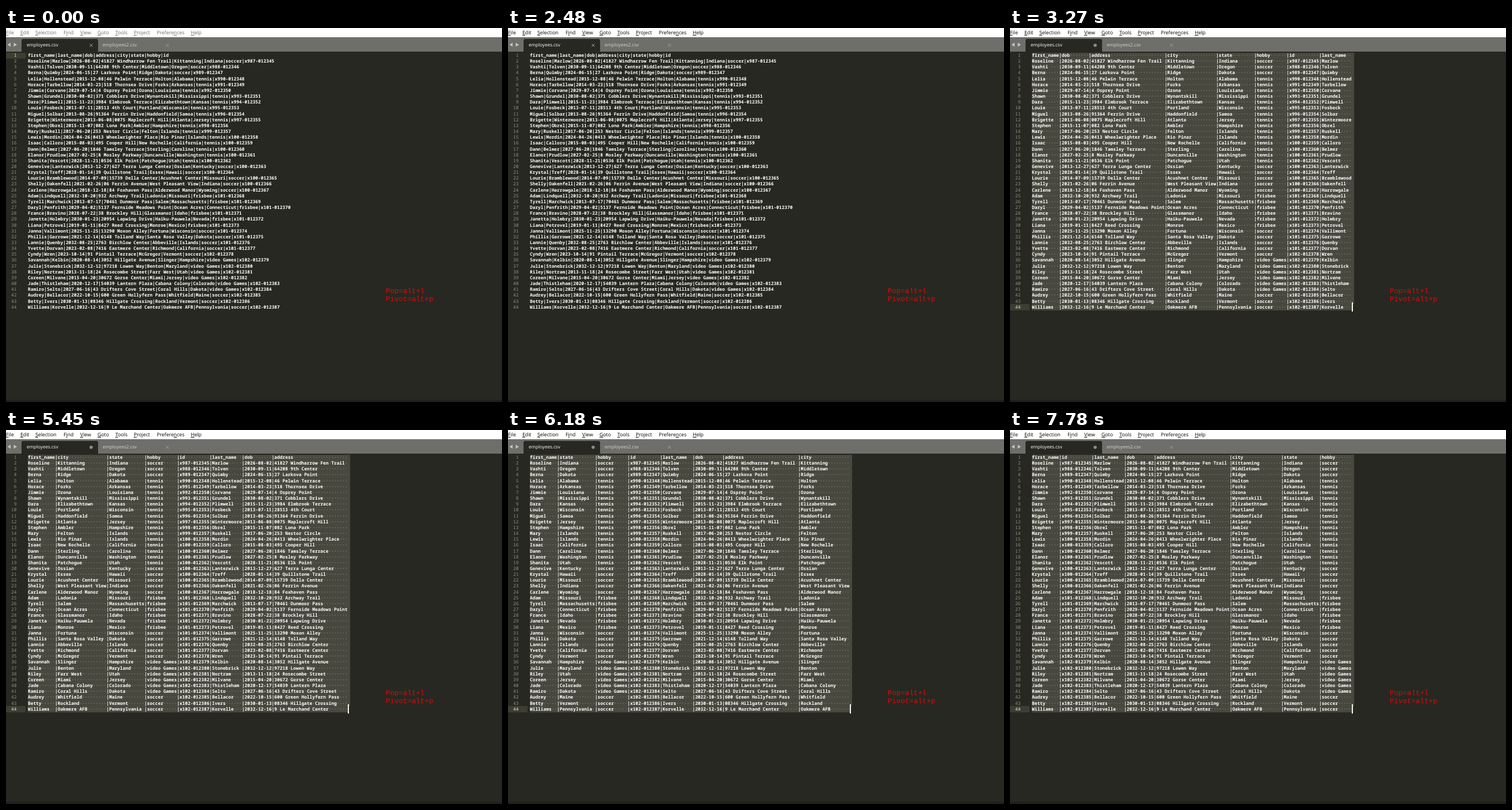
Recreate the animation shown at these times as an HTML page. Size 862 px wide and 649 px high, loop 8000 ms.

```html
<!DOCTYPE html>
<html lang="en">
<head>
<meta charset="utf-8">
<title>Column pivot</title>
<style>
  html, body { margin: 0; width: 100%; height: 100%; overflow: hidden; background: #272822; }
  #stage { position: relative; width: 862px; height: 649px; overflow: hidden; background: #272822;
    text-rendering: geometricPrecision; }
  #stage > *, #menu span, #tabs > *, .selection { position: absolute; white-space: pre; }
  #stage svg { left: 0; top: 0; }
  #menu { left: 0; top: 0; width: 862px; height: 16px; background: #fff; color: #000;
    font: 8.7px/17px "Open Sans", sans-serif; }
  #menu.idle { color: #6d6d6d; }
  #menu u { text-underline-offset: 1px; text-decoration-thickness: 1px; }
  #tabs { left: 0; top: 16px; width: 862px; height: 25px; background: #6e6f6a;
    font: 8.1px/24px "Open Sans", sans-serif; }
  #tabs span { top: 2px; }
  #code, #numbers { top: 43px; margin: 0; font: 600 7.857px/10.15px "Noto Sans Mono", monospace; }
  #code { left: 38px; color: #fff; }
  #code i { color: #5b5a50; font-style: normal; }
  #code.selected i { color: #85847a; }
  #numbers { left: 0; width: 18.5px; text-align: right; color: #8f908a; font-weight: 500; }
  #numbers .on { color: #e4e4de; }
  #band { left: 0; width: 34px; height: 10.15px; background: #3e3d32; }
  #selection { left: 0; top: 0; }
  .selection { background: #49483e; }
  #caret { width: 1.6px; height: 16px; background: #f8f8f0; }
  #hint { left: 660px; top: 450px; color: #d80c0c; font: 12.5px/14px "Liberation Mono", monospace; }
  #foot { left: 0; top: 645px; width: 862px; height: 4px; background: #20211c; }
</style>
</head>
<body>
<div id="stage">
  <div id="menu"></div>
  <div id="tabs">
    <svg width="862" height="25">
      <path d="M27 25V6q0-3 3-3H157q3 0 3 3V25Z" fill="#272822"/>
      <path d="M8 9.5v7L2.5 13ZM13.5 9.5v7L19 13Z" fill="#c3c4bf"/>
      <path id="close" d="M145.5 11.5l5 5m0-5l-5 5" stroke="#a3a49f"/>
      <circle id="dirty" cx="148" cy="14" r="2.8" fill="#8c8d88"/>
      <path d="M278 11.5l5 5m0-5l-5 5" stroke="#a0a19c"/>
    </svg>
    <span style="left:36px;color:#fff">employees.csv</span>
    <span style="left:168px;color:#d2d3ce">employees2.csv</span>
  </div>
  <div id="band"></div>
  <div id="selection"><div class="selection" id="block"></div><div class="selection" id="tail"></div></div>
  <pre id="numbers"></pre>
  <pre id="code"></pre>
  <div id="caret"></div>
  <div id="hint">Pop=alt+l
Pivot=alt+p</div>
  <div id="foot"></div>
  <svg id="pointer" width="7" height="13">
    <path d="M.5 .5H2.5L3.5 1.5 4.5 .5H6.5M3.5 1V12M.5 12.5H2.5L3.5 11.5 4.5 12.5H6.5" fill="none" stroke="#e6e6e2"/>
  </svg>
</div>
<script>
const LOOP = 8000, CHAR = 4.714, ROW = 10.15, LEFT = 38, TOP = 43;
const CLICK = 750, POINTER_OFF = 1410, BLUR = 2480;
const PIVOTS = [3270, 4530, 5450, 6180, 6920, 7780];
const $ = id => document.getElementById(id);

const people = `Roseline|Marlow|2026-08-02|41827 Windharrow Fen Trail|Kittanning|Indiana
Vashti|Tolven|2030-09-11|64208 9th Center|Middletown|Oregon
Berna|Quimby|2024-06-15|27 Larkova Point|Ridge|Dakota
Lelia|Hollenstead|2015-12-08|46 Pelwin Terrace|Holton|Alabama
Horace|Tarbellow|2014-03-23|518 Thornsea Drive|Forks|Arkansas
Jimmie|Corvane|2029-07-14|4 Osprey Point|Ozona|Louisiana
Shawn|Grundel|2030-08-02|371 Cobblers Drive|Wynantskill|Mississippi
Dara|Plimwell|2015-11-23|3984 Elmbrook Terrace|Elizabethtown|Kansas
Louie|Fosbeck|2013-07-11|28513 4th Court|Portland|Wisconsin
Miguel|Solbar|2013-08-26|91364 Ferrin Drive|Haddonfield|Samoa
Brigette|Wintermoore|2013-06-08|0075 Maplecroft Hill|Atlanta|Jersey
Stephen|Obrel|2015-11-07|082 Lona Park|Ambler|Hampshire
Mary|Ruskell|2017-06-20|253 Nestor Circle|Felton|Islands
Lewis|Mordin|2024-04-26|0413 Wheelwrighter Place|Rio Pinar|Islands
Isaac|Calloro|2015-08-03|495 Cooper Hill|New Rochelle|California
Dann|Belmer|2027-06-20|1846 Tamsley Terrace|Sterling|Carolina
Elanor|Prudlow|2027-02-25|8 Mosley Parkway|Duncanville|Washington
Shanita|Vescott|2028-11-21|0536 Elk Point|Patchogue|Utah
Genevive|Lanterwick|2013-12-27|627 Terra Lunga Center|Ossian|Kentucky
Krystal|Treff|2028-01-14|39 Quillstone Trail|Essex|Hawaii
Lourie|Bramblewood|2014-07-09|15739 Della Center|Acushnet Center|Missouri
Shelly|Oakenfell|2021-02-26|06 Ferrin Avenue|West Pleasant View|Indiana
Carlene|Harrowgale|2018-12-18|84 Foxhaven Pass|Alderwood Manor|Wyoming
Adam|Lindquell|2032-10-20|932 Archway Trail|Ladonia|Missouri
Tyrell|Marchwick|2013-07-17|70461 Dunmoor Pass|Salem|Massachusetts
Daryl|Penfrith|2029-04-02|5137 Fernside Meadows Point|Ocean Acres|Connecticut
France|Bravino|2028-07-22|38 Brockley Hill|Glassmanor|Idaho
Janetta|Holmbry|2030-01-23|20954 Lapwing Drive|Haiku-Pauwela|Nevada
Liana|Petrovel|2019-01-11|8427 Reed Crossing|Monroe|Mexico
Janna|Vallimont|2025-11-25|13290 Moxon Alley|Fortuna|Wisconsin
Phillis|Garrowe|2021-12-14|6148 Tolland Way|Santa Rosa Valley|Dakota
Lannie|Quenby|2032-08-25|2763 Birchlow Center|Abbeville|Islands
Yvette|Dorvan|2023-02-08|7416 Eastmere Center|Richmond|California
Cyndy|Wren|2023-10-14|91 Pintail Terrace|McGregor|Vermont
Savannah|Kelbin|2020-08-14|3052 Hillgate Avenue|Slinger|Hampshire
Julie|Stonebrick|2032-12-12|97218 Lowen Way|Benton|Maryland
Riley|Nortram|2013-11-18|24 Rosecombe Street|Farr West|Utah
Coreen|Milvane|2015-04-20|30672 Gorse Center|Miami|Jersey
Jade|Thistleham|2020-12-17|54039 Lantern Plaza|Cabana Colony|Colorado
Ramiro|Selto|2027-06-16|43 Drifters Cove Street|Coral Hills|Dakota
Audrey|Bellacor|2022-10-15|600 Green Hollyfern Pass|Whitfield|Maine
Betty|Ivers|2030-01-13|08346 Hillgate Crossing|Rockland|Vermont
Williams|Korvelle|2032-12-16|9 Le Marchand Center|Oakmere AFB|Pennsylvania`;

// Each hobby runs up to the given record.
const hobbyRuns = [[3, 'soccer'], [18, 'tennis'], [23, 'soccer'], [29, 'frisbee'],
  [34, 'soccer'], [40, 'video Games'], [43, 'soccer']];
const hobby = i => hobbyRuns.find(([end]) => i < end)[1];
const recordId = i => `x${i < 13 ? 987 + i : 100 + Math.floor((i - 13) / 10)}-0${12345 + i}`;

const table = ['first_name|last_name|dob|address|city|state|hobby|id'.split('|'),
  ...people.split('\n').map((line, i) => [...line.split('|'), hobby(i), recordId(i)])];
const widths = table[0].map((_, c) => Math.max(...table.map(row => row[c].length)));
const fullWidth = widths.reduce((a, b) => a + b) + widths.length - 1;
const lastRow = table.length;

// Every pivot moves the second column to the end.
function layout(pivots) {
  if (!pivots) return table.map(row => row.join('|'));
  const [first, ...rest] = widths.map((_, c) => c);
  const order = [first, ...rest.slice(pivots), ...rest.slice(0, pivots)];
  return table.map(row => order.map(c => row[c].padEnd(widths[c])).join('|'));
}
const dotted = line => line.replace(/ +/g, s => `<i>${'·'.repeat(s.length)}</i>`);
const texts = [0, ...PIVOTS].map((_, n) => layout(n).map(dotted).join('\n'));

const menu = [[0, '_File'], [25, '_Edit'], [51, '_Selection'], [100, 'F_ind'], [129, '_View'],
  [159, '_Goto'], [190, '_Tools'], [222, '_Project'], [262, 'Prefere_nces'], [321, '_Help']];
$('menu').innerHTML = menu.map(([x, label]) =>
  `<span style="left:${x}px">${label.replace(/_(.)/, '<u>$1</u>')}</span>`).join('');
$('numbers').innerHTML = table.map((_, i) => `<span>${i + 1}</span>`).join('\n');
const numbers = [...$('numbers').children];

const place = (el, x, y, w, h) => Object.assign(el.style,
  { left: x + 'px', top: y + 'px', width: w + 'px', height: h + 'px' });
place($('block'), LEFT, TOP, (fullWidth + 0.9) * CHAR, ROW * (lastRow - 1));
place($('tail'), LEFT, TOP + ROW * (lastRow - 1), fullWidth * CHAR, ROW);

const show = (id, on) => { $(id).style.visibility = on ? 'visible' : 'hidden'; };

function setState(pivots, line, caretChars) {
  const code = $('code');
  code.innerHTML = texts[pivots];
  code.className = pivots ? 'selected' : '';
  show('selection', pivots);
  show('dirty', pivots);
  show('close', !pivots);
  numbers.forEach((n, i) => { n.className = i + 1 === line ? 'on' : ''; });
  show('band', line);
  show('caret', caretChars);
  const y = TOP + ROW * (line - 1);
  $('band').style.top = y + 'px';
  $('caret').style.top = y - 3 + 'px';
  $('caret').style.left = LEFT + caretChars * CHAR - 0.3 + 'px';
}

function movePointer(t) {
  show('pointer', t >= 70 && t < POINTER_OFF);
  const step = Math.min(8, Math.max(0, Math.floor((t - 70) / 75.5)));
  const p = step / 8, ease = p * p * (3 - 2 * p);
  const x = Math.round(808 - 165 * ease), y = Math.round(605 - 540 * ease);
  $('pointer').style.transform = `translate(${x}px, ${y}px)`;
}

let shown = '';
function render(t) {
  const pivots = PIVOTS.filter(p => t >= p).length;
  const line = pivots ? lastRow : t < CLICK ? 1 : t < BLUR ? 3 : 0;
  const key = pivots + ':' + line;
  if (key !== shown) {
    shown = key;
    setState(pivots, line, pivots ? fullWidth : line === 3 ? table[2].join('|').length : 0);
    $('menu').className = line === 1 ? 'idle' : '';
  }
  movePointer(t);
}

const start = performance.now();
function tick() {
  render((performance.now() - start) % LOOP);
  requestAnimationFrame(tick);
}
tick();
</script>
</body>
</html>
```
